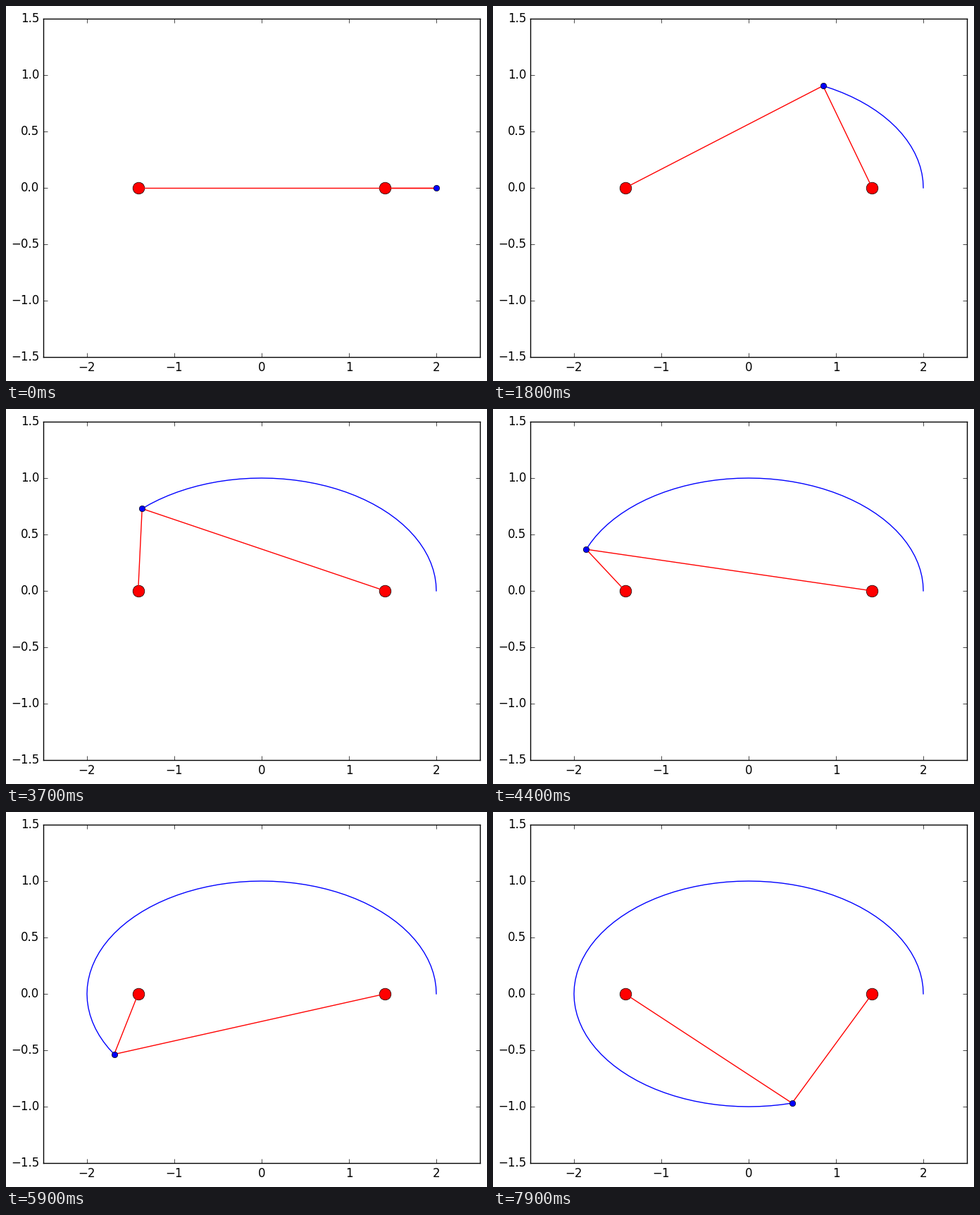
Recreate the animation shown at these times as a matplotlib script. Size 683 by 532 pixels, loop 8000 ms.

```python
import numpy as np
import matplotlib.pyplot as plt
from matplotlib.animation import FuncAnimation

plt.style.use("classic")
plt.rcParams["font.family"] = "DejaVu Sans"

W, H, DPI = 683, 532, 100
FRAMES, INTERVAL = 80, 100
STEP = 2 * np.pi / 100
A, B = 2.0, 1.0
FOCUS = np.sqrt(2)


def ellipse(i):
    return A * np.cos(STEP * i), B * np.sin(STEP * i)


fig = plt.figure(figsize=(W / DPI, H / DPI), dpi=DPI, facecolor="white")
ax = fig.add_axes([53 / W, 34 / H, 620 / W, 480 / H])
ax.set_xlim(-2.5, 2.5)
ax.set_ylim(-1.5, 1.5)
ax.set_xticks(range(-2, 3))
ax.set_yticks(np.arange(-1.5, 1.6, 0.5))

for f in (-FOCUS, FOCUS):
    ax.plot([f], [0], "ro", markersize=12)
trace, = ax.plot([], [], "b-")
strings = [ax.plot([], [], "r-")[0] for _ in range(2)]
dot, = ax.plot([], [], "bo", markersize=6)


def update(i):
    x, y = ellipse(i)
    trace.set_data(*ellipse(np.arange(i + 1)))
    for string, f in zip(strings, (-FOCUS, FOCUS)):
        string.set_data([f, x], [0, y])
    dot.set_data([x], [y])
    return [trace, *strings, dot]


anim = FuncAnimation(fig, update, frames=FRAMES, interval=INTERVAL,
                     init_func=lambda: update(0), repeat=True, repeat_delay=0)
plt.show()
```
